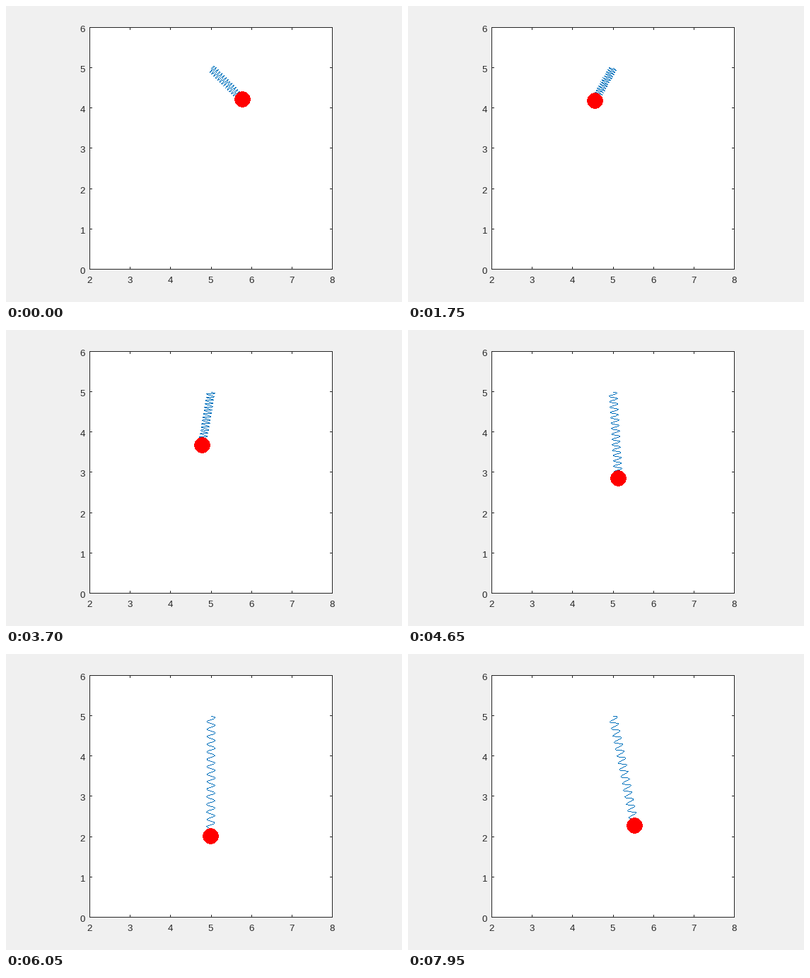
Write a matplotlib script that moves like this. It is 560 by 420 pixels and loops after 8000 ms.

```python
import numpy as np
import matplotlib.pyplot as plt
from matplotlib.animation import FuncAnimation

W, H = 560, 420
FRAMES, STEP = 160, 50
UNIT = 57.17                            # pixels per data unit
LEFT, RIGHT, TOP, BOTTOM = 118, 461, 30, 373
PIVOT = (290.0, 88.15)
COILS, COIL_R, BOB_R, TICK = 16, 0.1, 11.2, 4
GREY, WHITE, INK = (240,) * 3, (255,) * 3, (38,) * 3
BLUE, RED = (0, 114, 189), (255, 0, 0)

# Where the bob should pass: time in ms, x and y in pixels
NAN = np.nan
WAYPOINTS = np.array([
    (900, 282.5, 261.5), (1000, 271.5, 259.5), (1750, 264.5, NAN),
    (2550, 301.5, 265.3), (2600, 303.5, 267.5), (3450, 287.5, NAN),
    (3700, 277.5, 163.2), (4300, 276.5, 266.5), (4650, 297.5, 210.3),
    (5150, 320.5, NAN), (6000, 295.5, 260.5), (6050, 289.5, 258.5),
    (6850, 246.5, NAN), (7700, 299.5, 262.5), (7950, 320.5, 243.5),
])


def swing(gravity, stiffness, rest, lag, substeps=5):
    """Elastic pendulum let go at 45 degrees; complex offsets from the pivot."""
    z = 1.1 * np.exp(-0.25j * np.pi) + 0 * gravity
    v = 0 * z
    path = [z]
    for i in range(1, FRAMES):
        h = (STEP / 1000 - (lag if i == 1 else 0)) / substeps
        for _ in range(substeps):
            z = z + 0.5 * h * v
            v = v - h * (1j * gravity + stiffness * (1 - rest / np.abs(z)) * z)
            z = z + 0.5 * h * v
        path.append(z)
    return np.array(path)


def to_px(z):
    return PIVOT[0] + UNIT * z.real, PIVOT[1] - UNIT * z.imag


def fit():
    """Narrow a cloud of pendulums down to the one through the waypoints."""
    rng = np.random.default_rng(4)
    mean = np.array([15.0, 14.0, 1.0, 0.04])
    spread = np.array([2.5, 2.0, 0.25, 0.02])
    at = (WAYPOINTS[:, 0] / STEP).astype(int)
    for _ in range(14):
        trial = mean + spread * rng.standard_normal((2500, 4))
        x, y = to_px(swing(*trial.T)[at])
        miss = np.abs(x - WAYPOINTS[:, 1:2]) + np.nan_to_num(
            np.abs(y - WAYPOINTS[:, 2:3]))
        best = trial[np.argsort(miss.sum(axis=0))[:80]]
        mean, spread = best.mean(axis=0), best.std(axis=0)
    return mean


def make_stage():
    """Grey figure, white plot box and inward ticks, all in hard pixels."""
    img = np.full((H, W, 3), GREY, dtype=np.uint8)
    img[TOP:BOTTOM + 1, LEFT:RIGHT + 1] = INK
    img[TOP + 1:BOTTOM, LEFT + 1:RIGHT] = WHITE
    for n in range(7):
        col, row = round(LEFT + n * UNIT), round(BOTTOM - n * UNIT)
        img[TOP:TOP + TICK, col] = img[BOTTOM - TICK + 1:BOTTOM + 1, col] = INK
        img[row, LEFT:LEFT + TICK] = img[row, RIGHT - TICK + 1:RIGHT + 1] = INK
    return img


def plot_line(img, x, y, color):
    """One-pixel line: step one pixel at a time along the longer axis."""
    run = np.maximum(np.abs(np.diff(x)), np.abs(np.diff(y)))
    length = np.concatenate([[0], np.cumsum(run)])
    t = np.arange(0, length[-1])
    cols, rows = np.interp(t, length, x), np.interp(t, length, y)
    img[rows.astype(int), cols.astype(int)] = color


path = swing(*fit())
stage = make_stage()
grid_y, grid_x = np.mgrid[:H, :W]
s = np.linspace(0, 1, 400)
wave = COIL_R * np.sin(2 * np.pi * COILS * s)

fig = plt.figure(figsize=(W / 100, H / 100), dpi=100)
ax = fig.add_axes([0, 0, 1, 1])
ax.axis("off")
view = ax.imshow(stage, extent=(0, W, H, 0), aspect="auto",
                 interpolation="nearest")

font = dict(family="Liberation Sans", size=9.6, color="#262626", va="baseline")
for n in range(7):
    ax.text(LEFT + n * UNIT, 393, str(n + 2), ha="center", **font)
    ax.text(112, BOTTOM + 7 - n * UNIT, str(n), ha="right", **font)


def draw(i):
    z = path[i]
    img = stage.copy()
    plot_line(img, *to_px(z * s + wave * 1j * z / abs(z)), BLUE)
    x, y = np.floor(to_px(z))
    img[(grid_x - x) ** 2 + (grid_y - y) ** 2 <= BOB_R ** 2] = RED
    view.set_data(img)
    return view,


anim = FuncAnimation(fig, draw, frames=FRAMES, interval=STEP, repeat=True)
plt.show()
```
